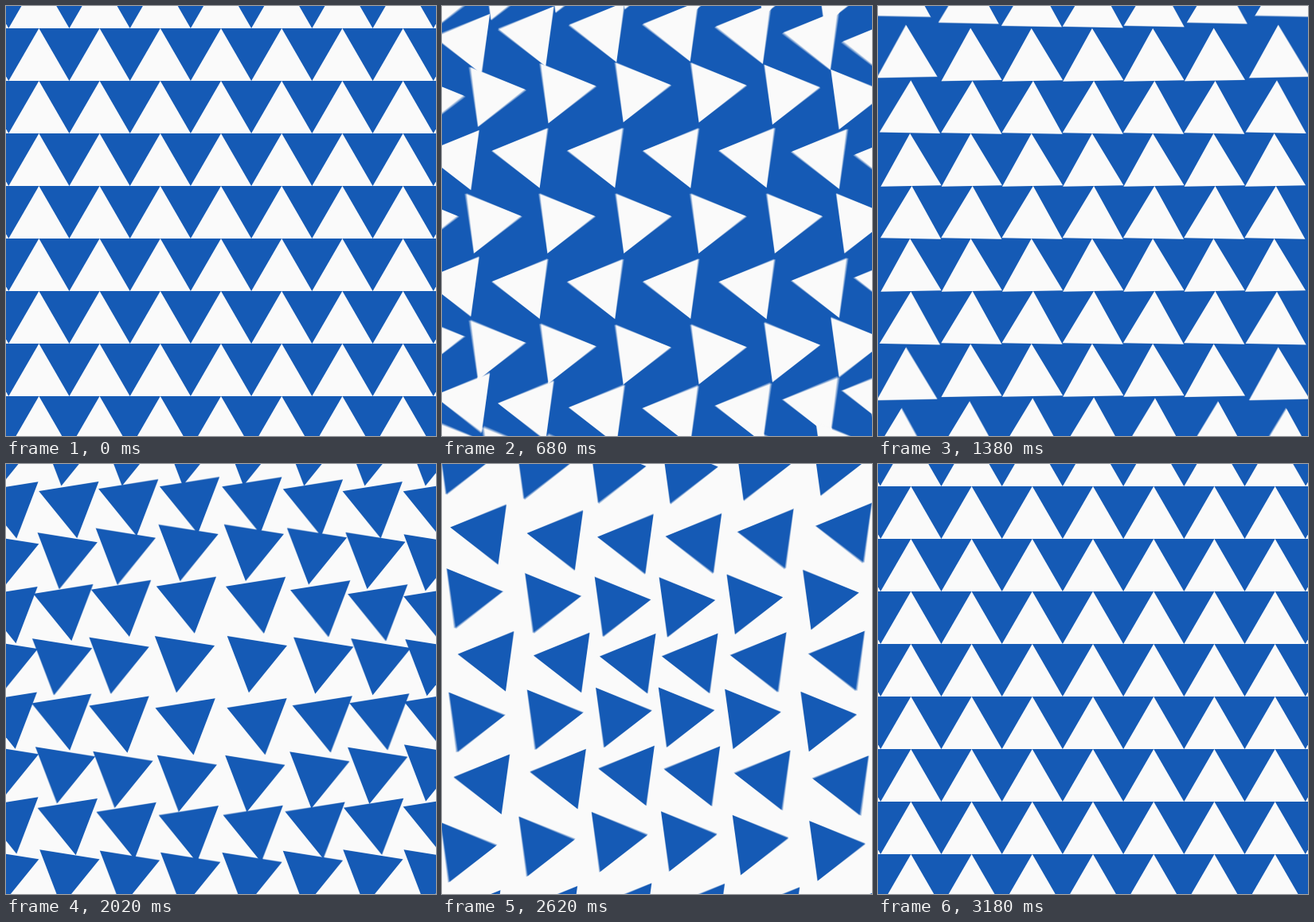
Write an HTML page with a canvas that moves like this. It is 540 px wide and 540 px high and loops after 3200 ms.

```html
<!DOCTYPE html>
<html>
<head>
<meta charset="utf-8">
<title>Triangles</title>
<style>
html, body { margin: 0; width: 100%; height: 100%; overflow: hidden; background: #155ab5; }
canvas { display: block; }
</style>
</head>
<body>
<canvas id="stage" width="540" height="540"></canvas>
<script>
const SIZE = 540, LOOP = 3200, HALF = LOOP / 2, STEP = 20;
const BLUE = '#155ab5', WHITE = '#fafafa';
const R = 44, ROW = R * 1.5, COL = R * Math.sqrt(3);
const SHUTTER = 12, SAMPLES = 6;

const out = document.getElementById('stage').getContext('2d');
const layer = document.createElement('canvas');
layer.width = layer.height = SIZE;
const ctx = layer.getContext('2d');

const clamp = v => Math.min(1, Math.max(0, v));
const ease = (p, g) => p < .5 ? .5 * (2 * p) ** g : 1 - .5 * (2 - 2 * p) ** g;

function triangle(x, y, angle) {
  ctx.beginPath();
  for (let k = 0; k < 3; k++) {
    const a = angle + k * 2 * Math.PI / 3;
    ctx.lineTo(x + R * Math.cos(a), y + R * Math.sin(a));
  }
  ctx.fill();
}

// The lattice swells outwards in a wave that starts at the centre.
function swell(p, dist) {
  const q = clamp(1.5 * p - .5 * dist / (SIZE / Math.SQRT2));
  return 1 + .25 * Math.sin(Math.PI * q) ** 2;
}

function drawScene(ms) {
  const flipped = ms >= HALF;
  const p = ms % HALF / HALF;
  const turn = ease(p, 3) * 2 * Math.PI / 3;
  const shift = ease(p, 4) * COL;
  const up = flipped ? -1 : 1;

  ctx.fillStyle = flipped ? WHITE : BLUE;
  ctx.fillRect(0, 0, SIZE, SIZE);
  ctx.fillStyle = flipped ? BLUE : WHITE;

  for (let j = -5; j <= 5; j++) {
    const dir = j % 2 ? 1 : -1;
    for (let i = -6; i <= 6; i++) {
      const x = (i + (flipped ? .5 : 0)) * COL + dir * shift;
      const y = j * ROW - (flipped ? R / 2 : 0);
      const s = swell(p, Math.hypot(x, y));
      triangle(SIZE / 2 + x * s, SIZE / 2 + y * s, up * (dir * turn - Math.PI / 2));
    }
  }
}

function frame() {
  const t = Math.floor(performance.now() % LOOP / STEP) * STEP;
  // Average several moments for motion blur.
  for (let k = 0; k < SAMPLES; k++) {
    drawScene(t + (k + .5) * SHUTTER / SAMPLES);
    out.globalAlpha = 1 / (k + 1);
    out.drawImage(layer, 0, 0);
  }
  requestAnimationFrame(frame);
}
frame();
</script>
</body>
</html>
```
